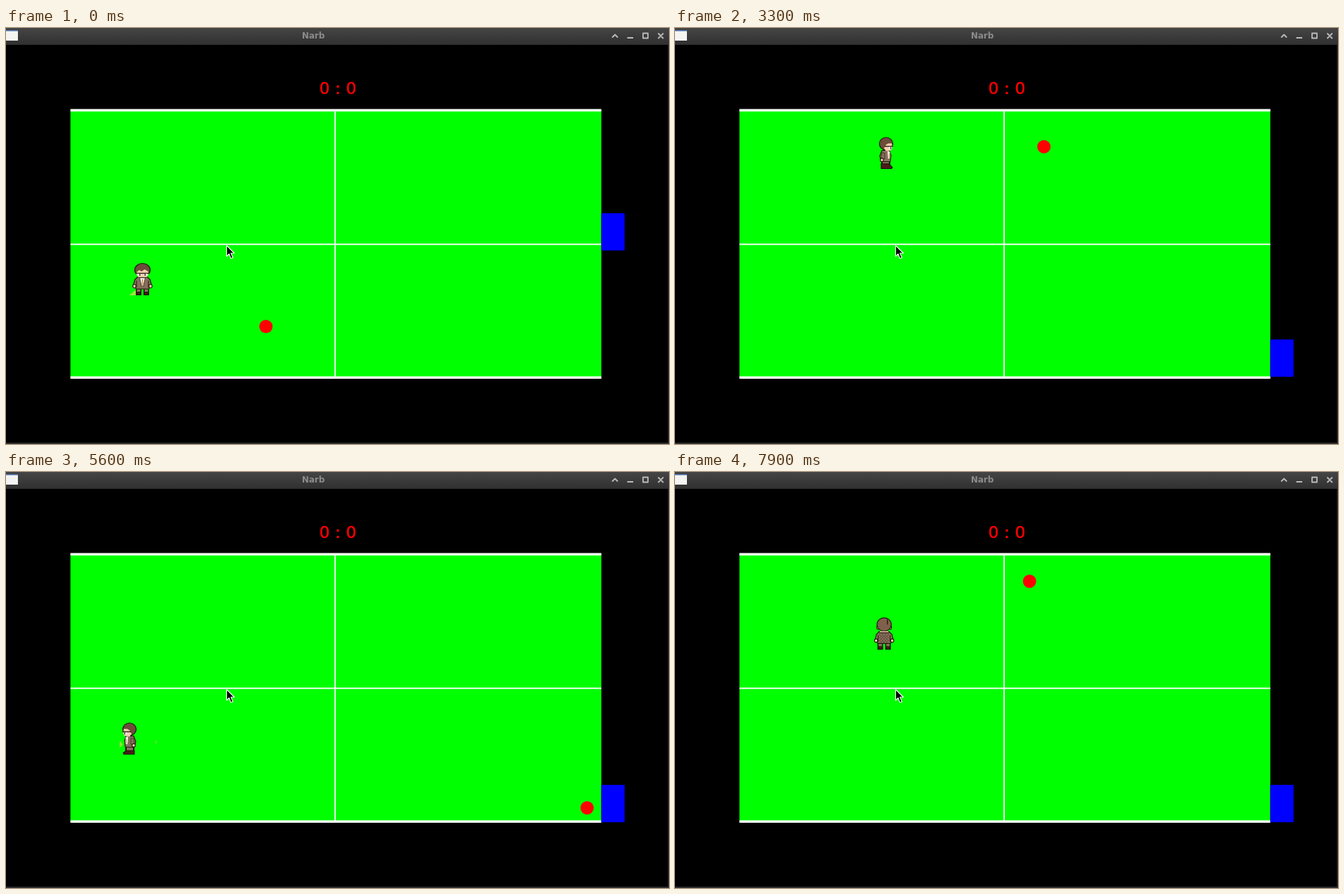
An HTML page with a canvas for the animation above (8000 ms loop, 945 by 593 pixels).

```html
<!DOCTYPE html>
<html lang="en">
<head>
<meta charset="utf-8">
<title>Narb</title>
<style>
  html, body { margin: 0; width: 100%; height: 100%; overflow: hidden; background: #000; }
  canvas { display: block; }
</style>
</head>
<body>
<canvas id="stage" width="945" height="593"></canvas>
<script>
const c = document.getElementById('stage').getContext('2d');
const LOOP = 8000, TICK = 100;
const BALL_SPEED = 0.1404, WALK_SPEED = 0.185, PADDLE_SPEED = 0.45; // px per ms
const INK = '#20150f', HAIR = '#6d4c3a', SUIT = '#87705a', DARK = '#4e3d30',
      SKIN = '#f6cfae', WHITE = '#fff', SHOE = '#4a1c18';

const DIRS = { up: [0, -1], down: [0, 1], left: [-1, 0], right: [1, 0] };
// The player's key presses: direction, pressed at, released at
const keys = [
  ['down', 0, 360], ['up', 1200, 1400], ['right', 1400, 1880], ['up', 1950, 3080],
  ['right', 3205, 3625], ['down', 3830, 4920], ['left', 4600, 5915], ['up', 5700, 6305],
  ['right', 5915, 6890], ['up', 7000, 7205],
];

const held = (t, from, to) => Math.max(0, Math.min(t, to) - from);

function playerAt(t) {
  let x = 194.5, y = 335, way = 'down', walking = false;
  for (const [dir, from, to] of keys) {
    const dist = WALK_SPEED * held(t, from, to);
    x += DIRS[dir][0] * dist;
    y += DIRS[dir][1] * dist;
    if (t > from) way = dir;
    if (t > from && t < to) walking = true;
  }
  return { x, y, way, walking };
}

// Folds a straight run back and forth between two walls
function bounce(run, low, high) {
  const span = high - low, u = run % (2 * span);
  return low + (u < span ? u : 2 * span - u);
}

function ballAt(t) {
  const run = BALL_SPEED * t, toPlayer = 154;
  return {
    x: run < toPlayer ? 370.5 - run : bounce(run - toPlayer, 216.5, 838.5),
    y: bounce(run + 299.75, 125.75, 485.5),
  };
}

// The second press is only a tap
const paddleY = t => Math.round(264 + PADDLE_SPEED * (held(t, 1400, 1800) + held(t, 4000, 4005)));

function rect(color, x, y, w, h) {
  c.fillStyle = color;
  c.fillRect(x, y, w, h);
}

function paint(color, edge) {
  c.fillStyle = color;
  c.fill();
  if (edge) { c.strokeStyle = edge; c.lineWidth = 1.1; c.stroke(); }
}

function oval(color, x, y, rx, ry, edge) {
  c.beginPath();
  c.ellipse(x, y, rx, ry, 0, 0, 7);
  paint(color, edge);
}

function poly(color, pts, edge) {
  c.beginPath();
  for (let i = 0; i < pts.length; i += 2) c.lineTo(pts[i], pts[i + 1]);
  c.closePath();
  paint(color, edge);
}

function mirrored(part) {
  for (const side of [-1, 1]) {
    c.save();
    c.scale(side, 1);
    part(side);
    c.restore();
  }
}

function body(lift) {
  mirrored(side => {
    const up = side < 0 ? lift : 0;
    rect(INK, 1.5, 34 - up, 8, 12);
    rect(SUIT, 3, 34 - up, 5, 7);
    rect(SHOE, 3, 42 - up, 5, 2.5);
  });
  poly(SUIT, [-7, 20, 7, 20, 11, 24, 13, 32, 9, 37, -9, 37, -13, 32, -11, 24], INK);
  mirrored(() => {
    rect(INK, 8, 25, 1, 10);
    oval(SKIN, 11.5, 33, 2.3, 2.5, INK);
  });
}

function front(lift) {
  poly('#9be83c', [-19, 46, -9, 38, -9, 46]);
  body(lift);
  poly(WHITE, [-4, 21, 4, 21, 1.5, 33, -1.5, 33], DARK);
  rect('#c9975f', -1, 23, 2, 9);
  oval(HAIR, 0, 10, 11, 9.5, INK);
  poly(SKIN, [-8, 13, -5, 10, -1, 12, 3, 9, 8, 12, 9, 16, 6, 20, -6, 20, -9, 16]);
  rect(INK, -9, 14, 18, 1.3);
  mirrored(() => {
    rect(WHITE, 2, 15.3, 5, 2.7);
    rect(INK, 3, 15.3, 1.5, 2.7);
  });
}

function back(lift) {
  body(lift);
  for (let y = 24; y < 36; y += 2)
    for (let x = -7 + y % 4; x < 7; x += 4) rect(DARK, x, y, 1.5, 1.5);
  mirrored(() => oval(SKIN, 9, 14.5, 1.5, 2.5, INK));
  oval('#80604c', 0, 10, 10.2, 9.5, INK);
  rect(INK, 4, 3, 1.3, 7);
  rect('#e3c3a1', -6, 19.5, 12, 1.5);
  rect(INK, -7, 21.5, 14, 1);
}

function profile(lift) {
  rect(INK, -7, 33, 13, 9);
  rect(SUIT, -5, 34, 9, 6);
  poly(SHOE, [-7, 40 - lift, 4, 40 - lift, 9, 43, 8, 45, -7, 45], INK);
  poly(SUIT, [-6, 19, 5, 19, 7, 26, 6, 35, -7, 35, -9, 27], INK);
  poly(WHITE, [2, 20, 5.5, 21, 5.5, 30, 3, 31]);
  rect('#c9975f', 4, 23, 1.3, 7);
  poly(SUIT, [-6, 22, -2, 23, -2, 31, -7, 31], DARK);
  oval(SKIN, -6, 32.5, 2.3, 2.4, INK);
  oval(HAIR, 0, 9.5, 9.6, 9, INK);
  poly(SKIN, [0, 11, 3, 9, 8, 9, 9, 15, 7, 19, 0, 20, -3, 16]);
  rect(INK, -2, 12.5, 12, 1.3);
  rect(WHITE, 4, 14, 4, 3);
  rect(INK, 6, 14, 1.3, 3);
}

const POSES = { down: front, up: back, left: profile, right: profile };

function player(t) {
  const { x, y, way, walking } = playerAt(t);
  c.save();
  c.translate(x, y);
  if (way === 'left') {
    poly('#8be03a', [-14, 26, -9, 31, -14, 36]);
    rect('#5fe030', 37, 26, 2, 4);
    c.scale(-1, 1);
  }
  POSES[way](walking && t / TICK % 2 ? 2 : 0);
  c.restore();
}

function label(text, font, color, x, y) {
  c.font = font;
  c.fillStyle = c.strokeStyle = color;
  c.textAlign = 'center';
  c.fillText(text, x, y);
}

function windowFrame() {
  rect('#000', 0, 0, 945, 593);
  const bar = c.createLinearGradient(0, 0, 0, 24);
  bar.addColorStop(0, '#454545');
  bar.addColorStop(1, '#303030');
  rect(bar, 0, 0, 945, 24);
  rect('#2d2d2d', 0, 591, 945, 2);
  rect('#2d2d2d', 943.5, 24, 1.5, 569);
  rect('#f4f4f2', 0, 3, 17, 15);
  rect('#4a70b0', 0, 3, 17, 1.5);
  label('Narb', 'bold 12px "DejaVu Sans", sans-serif', '#8c8c8c', 438, 15);
  c.strokeStyle = '#bcbcbc';
  c.lineWidth = 1.8;
  c.stroke(new Path2D('M864 13.5l4-4 4 4M885.5 14h8.5M908 7.5h7v7h-7zM929.5 7.5l7.5 7.5m0-7.5l-7.5 7.5'));
}

function field() {
  label('0 : 0', '23.5px "DejaVu Sans", sans-serif', '#f00', 473, 94);
  c.lineWidth = 0.5;
  c.strokeText('0 : 0', 473, 94);
  rect('#0f0', 91.8, 116, 756.7, 383.5);
  rect(WHITE, 91.8, 115.5, 756.7, 3.5);
  rect(WHITE, 91.8, 496.5, 756.7, 3.5);
  rect(WHITE, 468.2, 116, 1.8, 384);
  rect(WHITE, 91.8, 307.4, 756.7, 1.9);
}

function draw(now) {
  const t = Math.floor(now % LOOP / TICK) * TICK;
  const ball = ballAt(t);
  c.lineJoin = 'round';
  windowFrame();
  field();
  rect('#00f', 848.5, paddleY(t), 33.2, 53.2);
  player(t);
  oval('#f00', ball.x, ball.y, 9.5, 9.5);
  poly('#000', [314.5, 310, 314.5, 325.5, 318, 322, 320.5, 328.5, 323.5, 327.5, 320.7, 321, 325.5, 321], WHITE);
}

const start = performance.now();
(function play() {
  draw(performance.now() - start);
  requestAnimationFrame(play);
})();
</script>
</body>
</html>
```
